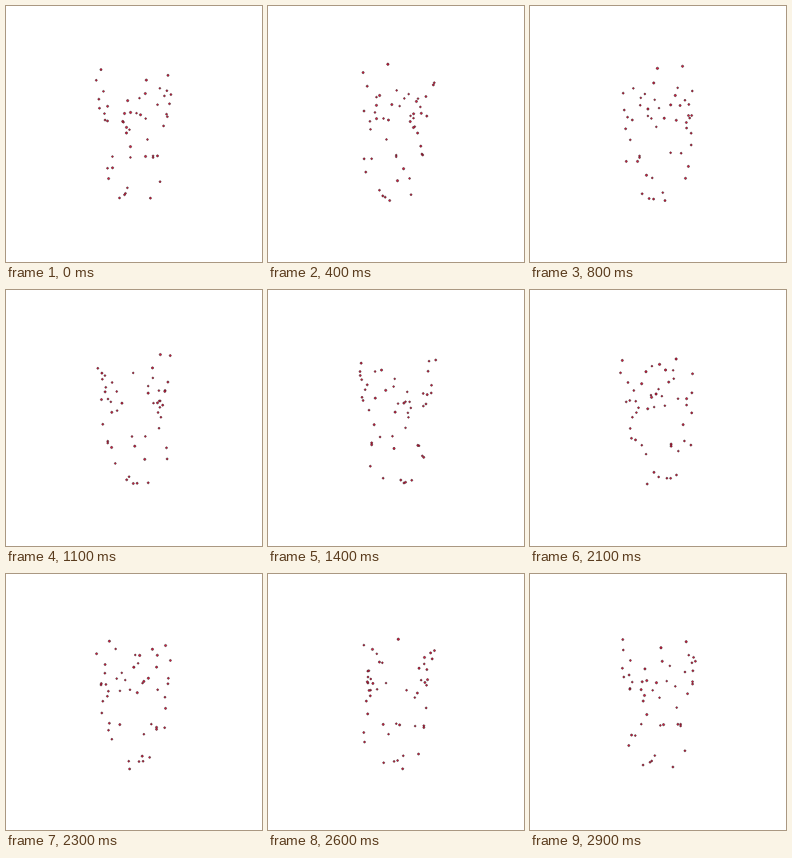
An HTML page with a canvas for the animation above (3000 ms loop, 256 px wide and 256 px high).

```html
<!DOCTYPE html>
<html lang="en">
<head>
<meta charset="utf-8">
<title>Rotating point cloud</title>
<style>
  html, body { margin: 0; height: 100%; overflow: hidden; background: #fff; }
  canvas { display: block; width: 256px; height: 256px; }
</style>
</head>
<body>
<canvas id="stage" width="256" height="256"></canvas>
<script>
const ctx = document.getElementById('stage').getContext('2d');
const CENTER = 128, CAMERA = 240, STEPS = 30, STEP_MS = 100;

// Points as [x, z, y] around the vertical axis, z towards the viewer.
const top3d = [
  [-31, 18, -60], [-39, -5, -55.3], [30, 25, -53], [10, 37, -46], [-32, -7.5, -44.5],
  [28, -25, -51], [34, -12, -46], [9.5, 29, -36], [32, -16.7, -41.3], [36.5, -.6, -40],
  [-34, 11, -33.7], [-6, 29.5, -29.7], [5.7, -35.2, -41.7], [-34, 7, -25.5], [-25, 17, -26.2],
  [24.7, -17.5, -32], [34.4, 4.2, -30.2]
];
const middle3d = [
  [-31.6, -12.5, -22], [-8.8, 28.5, -18.5], [-3.4, 33, -19], [2.3, -34, -24.3], [5.2, 33, -17],
  [33.2, -8.6, -21], [33.5, -4.6, -18.2], [12.6, -31, -18], [-29.2, 2, -14.3], [-25.5, 13.4, -12.8],
  [-10.5, 26, -11.6], [-12.2, -26, -13.6], [-7.1, 27, -6.3], [-5.7, -32.4, -5.5], [-7, 31.6, -1.3],
  [29, .6, -8.6], [14.5, -28.2, 5.6], [-3.5, 32.5, 10.5]
];
const bottom3d = [
  [-24, -21.3, 24], [-4.6, -31.8, 26], [9.9, 25, 19.7], [20, -18.4, 23], [20, -18.4, 24.8],
  [21.5, 15.6, 20], [-28.5, -13.6, 35.7], [-19.6, 25.9, 29.7], [-23.5, 22.3, 40], [26, -4.2, 48],
  [-7.6, -16.6, 57], [-9.4, -10, 61.3], [-10.2, -5.8, 61.7], [-14.7, 4.6, 62.2], [15.5, 6.2, 62]
];
const points = [...top3d, ...middle3d, ...bottom3d];

ctx.fillStyle = '#dc143c';
ctx.strokeStyle = '#222';
ctx.lineWidth = .5;

function dot(x, y, radius) {
  ctx.beginPath();
  ctx.arc(x, y, radius, 0, Math.PI * 2);
  ctx.fill();
  ctx.stroke();
}

function draw(now) {
  const step = Math.floor(now / STEP_MS) % STEPS;
  const angle = step / STEPS * Math.PI * 2;
  const cos = Math.cos(angle), sin = Math.sin(angle);
  ctx.clearRect(0, 0, 256, 256);
  for (const [x, z, y] of points) {
    const scale = CAMERA / (CAMERA - (z * cos - x * sin));
    dot(CENTER + .5 + (x * cos + z * sin) * scale, CENTER + .5 + y * scale, scale);
  }
  requestAnimationFrame(draw);
}
draw(0);
</script>
</body>
</html>
```
